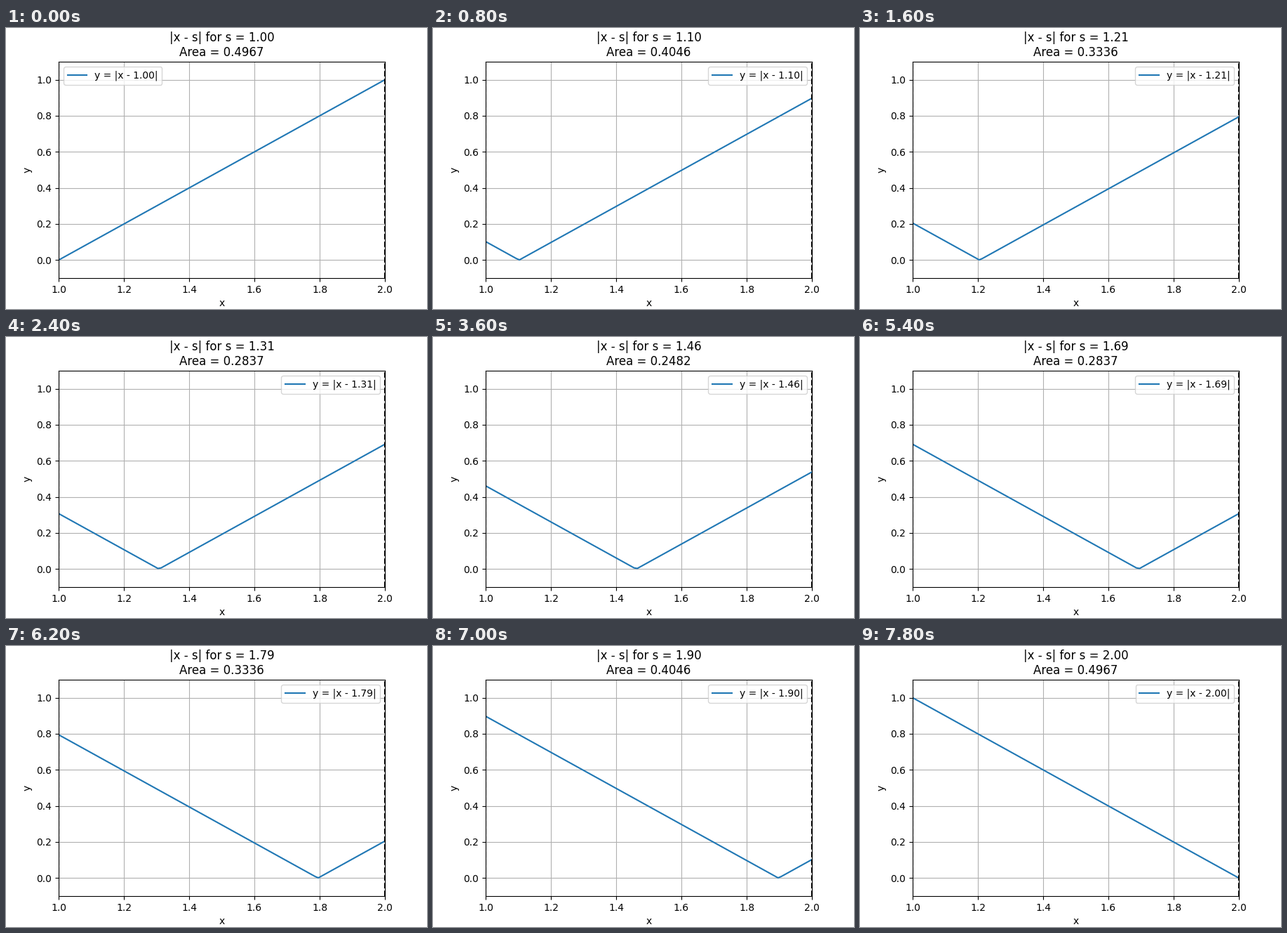
Write a matplotlib script that moves like this. It is 600 px wide and 400 px high and loops after 10000 ms.

```python
import numpy as np
import matplotlib.pyplot as plt
from matplotlib.animation import FuncAnimation

STEPS = 40      # values of s swept from 1 to 2
FRAMES = 50     # the last value is held to the end of the loop
INTERVAL = 200

x = np.linspace(0, 3, 300)
inside = (x >= 1) & (x <= 2)
shifts = np.linspace(1, 2, STEPS)

fig, ax = plt.subplots(figsize=(6, 4), dpi=100)
line, = ax.plot(x, np.abs(x - 1), label="y = |x - 1.00|")
for edge in (1, 2):
    ax.axvline(edge, color="black", linestyle="--")
ax.set_xlim(1, 2)
ax.set_ylim(-0.1, 1.1)
ax.set_xlabel("x")
ax.set_ylabel("y")
ax.grid(True)
legend = ax.legend(loc="best")


def area_under(y):
    """Trapezoid rule over the samples between 1 and 2."""
    xs, ys = x[inside], y[inside]
    return np.sum(np.diff(xs) * (ys[1:] + ys[:-1]) / 2)


def update(frame):
    s = shifts[min(frame, STEPS - 1)]
    y = np.abs(x - s)
    line.set_ydata(y)
    legend.get_texts()[0].set_text(f"y = |x - {s:.2f}|")
    ax.set_title(f"|x - s| for s = {s:.2f}\nArea = {area_under(y):.4f}")
    return line, legend


def init():
    return update(0)


anim = FuncAnimation(fig, update, frames=FRAMES, init_func=init,
                     interval=INTERVAL, repeat=True, blit=False)
plt.show()
```
